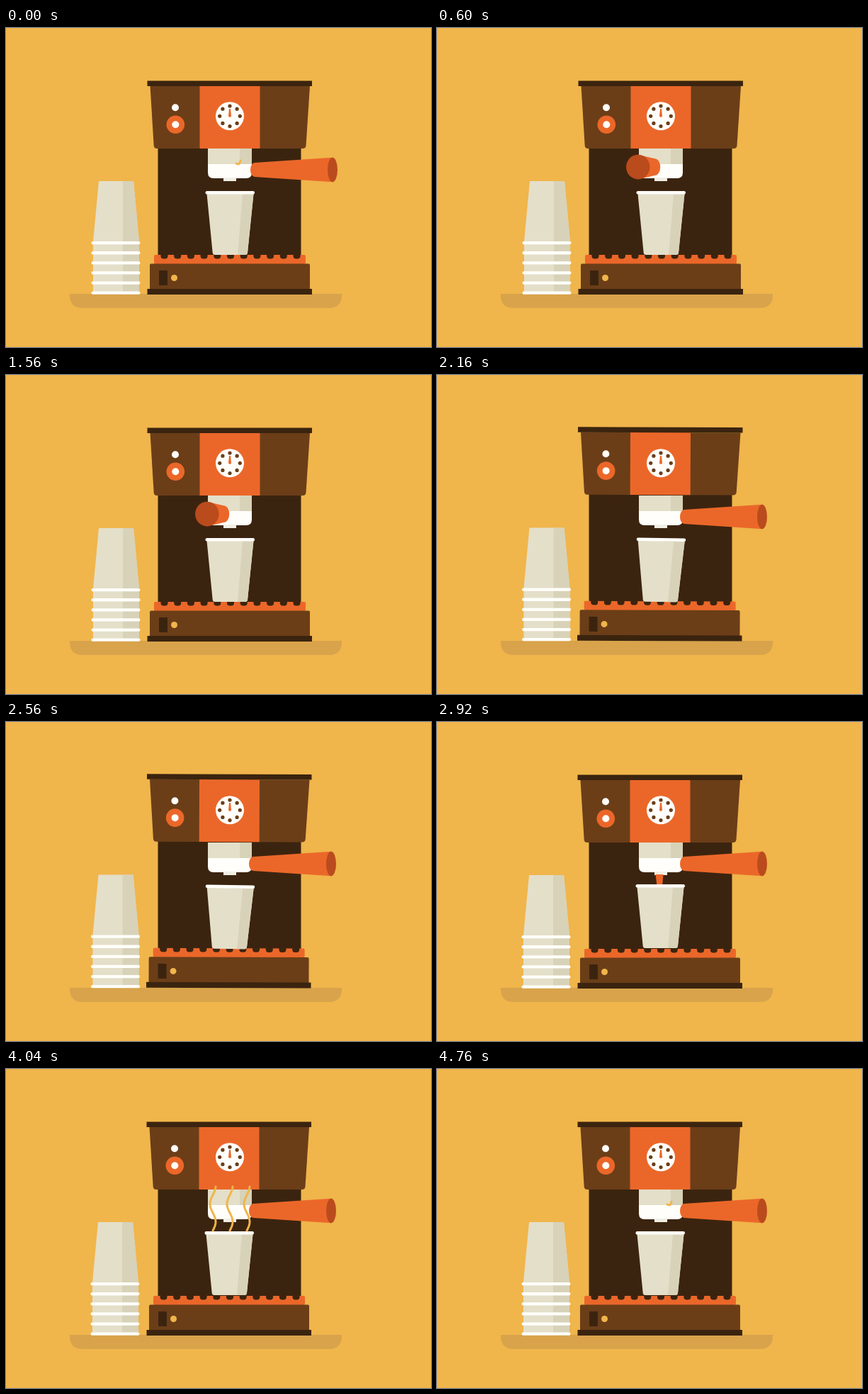
An HTML page that plays this animation: 600 px wide and 450 px high, repeating every 4800 ms.

```html
<!DOCTYPE html>
<html>
<head>
<meta charset="utf-8">
<style>
  html, body { margin: 0; height: 100%; overflow: hidden; background: #f0b54b; }
  svg { display: block; width: 100vw; height: 100vh; }
  .dark { fill: #3b240f; }
  .brown { fill: #6b3e18; }
  .orange { fill: #eb6729; }
  .white { fill: #fffefa; }
  .cream { fill: #e4dfc9; }
  .shade { fill: #d8d2b9; }
  .yellow { fill: #f0b54b; }
  #steam path { fill: none; stroke: #f0b54b; stroke-width: 3; stroke-linecap: round; }
</style>
</head>
<body>
<svg viewBox="0 0 600 450">
  <path fill="#d8a34b" d="M90 375H474V377Q474 395 455 395H109Q90 395 90 377Z"/>
  <g id="stack">
    <path class="cream" d="M131 216H180L188 301V375H123V301Z"/>
    <path class="shade" d="M165 216H180L188 301V375H165Z"/>
  </g>
  <rect class="dark" x="214.500" y="165" width="202" height="157"/>
  <g id="shell">
    <path class="brown" d="M203.500 82H429L423.500 166Q423 170 419 170H213Q209 170 208.700 166Z"/>
    <rect class="orange" x="273.500" y="82" width="85" height="88"/>
    <rect class="dark" x="199.500" y="74.500" width="232.500" height="7.500"/>
    <circle class="white" cx="239" cy="112.300" r="5"/>
    <circle class="orange" cx="239.300" cy="136.200" r="12.800"/>
    <circle class="white" cx="239.300" cy="136.200" r="5"/>
    <g id="grill"><rect class="orange" x="209" y="320" width="214" height="13" rx="2"/></g>
    <rect class="brown" x="203" y="332.500" width="226" height="37" rx="2"/>
    <rect class="dark" x="199.500" y="368" width="232.500" height="8"/>
    <rect class="dark" x="216" y="342" width="12" height="21" rx="1"/>
    <circle class="yellow" cx="237.500" cy="352.500" r="4.500"/>
  </g>
  <g id="dial">
    <circle class="white" cx="316" cy="124.300" r="20"/>
    <path class="orange" d="M315 114H317L318 124.500Q316 127 314 124.500Z"/>
  </g>
  <rect class="cream" x="285" y="170" width="62" height="25"/>
  <rect class="shade" x="330" y="170" width="17" height="25"/>
  <path class="white" d="M285 192H347V204Q347 212 339 212H293Q285 212 285 204Z"/>
  <rect x="307" y="211" width="18" height="5" fill="#f1efe4"/>
  <path id="coffee" class="orange" d="M308.500 215H319.500L318 231H310.500Z"/>
  <g id="cup">
    <path class="cream" d="M283.500 234H349.500L341 317Q340.500 320 338 320H295Q292 320 291.700 317Z"/>
    <path class="shade" d="M334 234H349.500L341 317Q340.500 320 338 320H327Z"/>
    <rect class="white" x="281.500" y="230" width="69.500" height="4.500" rx="2.200"/>
  </g>
  <g id="steam"></g>
  <g id="handle">
    <path id="grip" class="orange"/>
    <ellipse id="gripBase" class="orange"/>
    <ellipse id="gripEnd" fill="#ba4b1d"/>
  </g>
</svg>
<script>
const LOOP = 4800, SWING = 480;
const BREW_START = 1960, BREW_END = 3400;
const $ = id => document.getElementById(id);

function add(parent, tag, attrs) {
  const el = document.createElementNS("http://www.w3.org/2000/svg", tag);
  set(el, attrs);
  return parent.appendChild(el);
}

function set(el, attrs) {
  for (const name in attrs) el.setAttribute(name, attrs[name]);
}

for (let i = 0; i < 6; i++)
  add($("stack"), "rect", { class: "white", x: 120.5, y: 301 + i * 14.1, width: 69, height: 4.3, rx: 2.1 });

for (let i = 0; i < 8; i++) {
  const a = i * Math.PI / 4;
  add($("dial"), "circle", { class: "brown", cx: 316 + 14.3 * Math.sin(a), cy: 124.3 - 14.3 * Math.cos(a), r: 2.6 });
}

for (let i = 0; i < 11; i++)
  add($("grill"), "rect", { class: "dark", x: 218.5 + i * 18.7, y: 315, width: 10, height: 10.5, rx: 4 });

const wisps = [292, 316, 340].map(x => ({ x, path: add($("steam"), "path", {}) }));
const curl = add($("steam"), "path", { d: "M325 191Q330 194 331 187" });

// The handle pivots around the brew head, from 90° (right) to -21° (front left).
function handleAngle(t) {
  if (t >= 4 * SWING) return 90;
  const p = t % SWING / SWING;
  const returning = Math.floor(t / SWING) % 2;
  const open = returning ? 1 - p ** 1.84 : 1 - (1 - p) ** 3;
  return 90 - 111 * open;
}

function drawHandle(angle) {
  const a = angle * Math.PI / 180, s = Math.sin(a), c = Math.cos(a);
  const y = 200 - 4 * c, baseX = 315 + 36 * s, endX = 315 + 146 * s;
  const baseR = 10 + 2 * c, endR = 17.3;
  set($("grip"), { d: `M${baseX} ${y - baseR}L${endX} ${y - endR}V${y + endR}L${baseX} ${y + baseR}Z` });
  set($("gripBase"), { cx: baseX, cy: y, rx: 6 + 2 * c, ry: baseR });
  set($("gripEnd"), { cx: endX, cy: y, rx: 7 + 10 * c, ry: endR });
}

function pose(shell, stack, cup, handle) {
  const parts = { shell, stack, cup, handle };
  for (const id in parts) set($(id), { transform: parts[id] });
}

// The machine rattles while brewing and settles a touch to the left.
function drawShake(t) {
  const settled = t >= BREW_END || Math.floor(t / 40) % 2;
  if (t < BREW_START) pose("", "", "", "");
  else if (settled) pose("translate(-1 0)", "translate(-1 0)", "translate(-1 -1)", "translate(-2 0)");
  else pose("translate(-1 -.8) rotate(.2 316 225)", "translate(-.5 -.5)",
            "translate(-1 0) rotate(.8 316 320)", "translate(-2 0)");
}

function drawSteam(t) {
  const rise = (t - BREW_END) / 1240;
  for (const { x, path } of wisps) {
    const top = Math.max(165, 228 - 200 * rise);
    const bottom = Math.min(228, 228 - 150 * (rise - 0.55));
    let d = "";
    if (rise > 0 && bottom > top)
      for (let y = bottom; y >= top; y -= 2)
        d += (d ? "L" : "M") + (x + 4 * Math.sin((228 - y) / 8)) + " " + y;
    set(path, { d });
  }
  curl.style.display = t < 40 || t >= 4640 ? "" : "none";
}

function draw(now) {
  const t = now % LOOP;
  drawShake(t);
  drawHandle(handleAngle(t));
  $("coffee").style.display = t >= 2800 && t < 3900 ? "" : "none";
  drawSteam(t);
}

let start;
function tick(now) {
  start ??= now;
  draw(now - start);
  requestAnimationFrame(tick);
}

draw(0);
requestAnimationFrame(tick);
</script>
</body>
</html>
```
